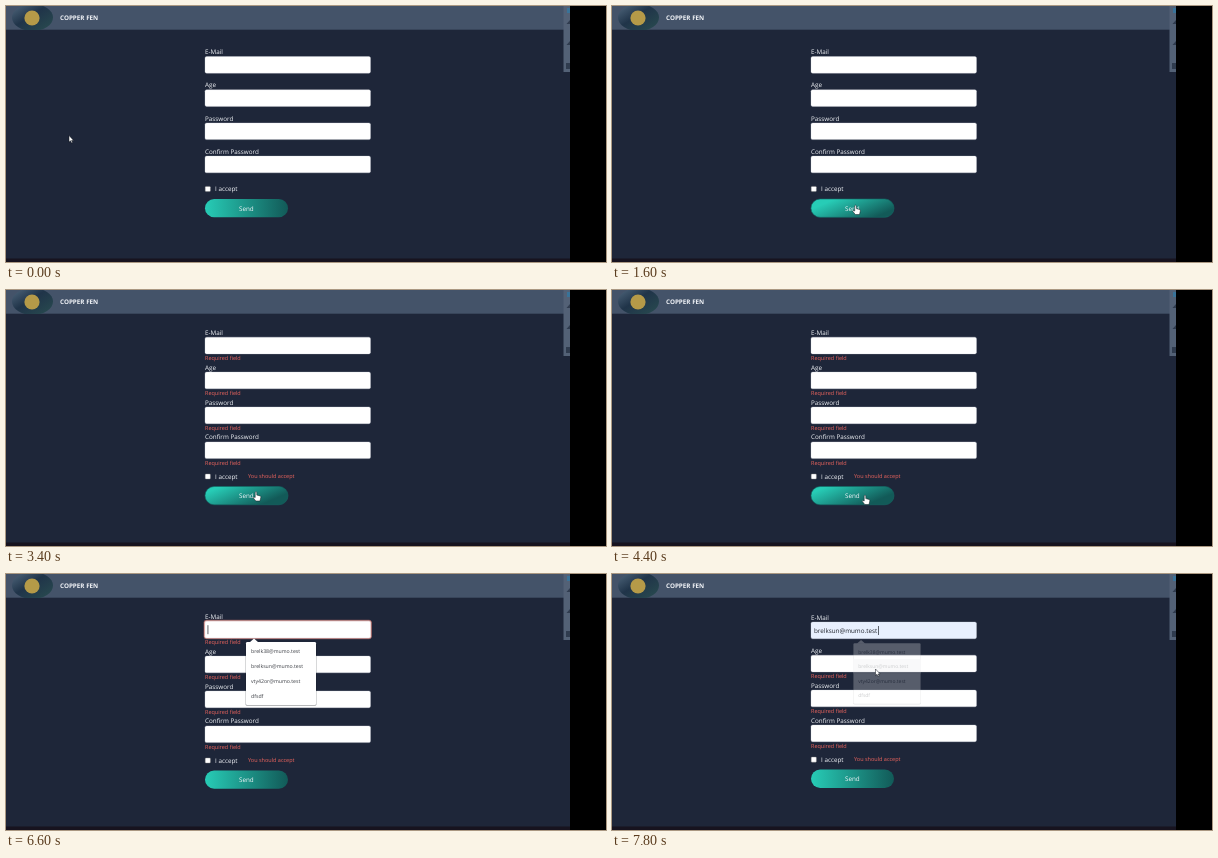
An HTML page that plays this animation: 600 by 256 pixels, repeating every 8000 ms.

```html
<!DOCTYPE html>
<html lang="en">
<head>
<meta charset="utf-8">
<title>Sign-up form</title>
<style>
  html, body { margin: 0; width: 100%; height: 100%; overflow: hidden; background: #1e2639; }
  svg { display: block; width: 600px; height: 256px; }
  text { font: 6.3px "Open Sans", "Noto Sans", sans-serif; fill: #f4f6fa; text-rendering: geometricPrecision; }
  .brand { font-weight: 700; }
  .error { font-size: 5.5px; fill: #ee655e; }
  .option { font-size: 5.2px; fill: #3c3f45; }
  .value { fill: #20242c; }
</style>
</head>
<body>
<svg viewBox="0 0 600 256">
  <defs>
    <linearGradient id="idle"><stop stop-color="#27ccb6"/><stop offset="1" stop-color="#125a58"/></linearGradient>
    <linearGradient id="hover" gradientUnits="userSpaceOnUse" x1="230" y1="190" x2="243" y2="220">
      <stop stop-color="#27ccb6"/><stop offset="1" stop-color="#125a58"/>
    </linearGradient>
    <linearGradient id="photo" x2="1" y2="1">
      <stop stop-color="#52697f"/><stop offset=".45" stop-color="#203449"/><stop offset="1" stop-color="#294d50"/>
    </linearGradient>
    <clipPath id="bar"><rect width="564" height="24"/></clipPath>
  </defs>

  <rect width="564" height="256" fill="#1e2639"/>
  <rect width="564" height="23.7" fill="#445369"/>
  <g clip-path="url(#bar)">
    <ellipse cx="26.5" cy="11.5" rx="20.5" ry="13.5" fill="url(#photo)"/>
    <circle cx="26" cy="12" r="7.6" fill="#b59a48"/>
  </g>
  <text class="brand" x="54" y="14.2">COPPER FEN</text>
  <rect y="252.5" width="564" height="3.5" fill="#17131f"/>

  <rect x="557.5" width="6.5" height="66" fill="#536176"/>
  <rect x="561" y="2" width="3" height="5" fill="#397399"/>
  <g fill="#2f3b4e">
    <path d="M560.5 18l3.5-4v4zM560.5 39l3.5-4v4z"/>
    <rect x="560" y="57" width="4" height="6"/>
  </g>
  <rect x="564" width="36" height="256" fill="#000"/>

  <g id="scene"></g>
</svg>

<script>
const LOOP = 8000, TICK = 200;
const ERRORS_AT = 2800, OPEN_AT = 5200, PICK_AT = 7800;
const labels = ["E-Mail", "Age", "Password", "Confirm Password"];
const options = ["brelk38@mumo.test", "brelksun@mumo.test", "vty42or@mumo.test", "dfsdf"];

// Pointer stops: time, x, y
const stops = [
  [0, 63, 129.5], [200, 63, 129.5], [1000, 223.5, 191], [1200, 225, 192],
  [1800, 250, 201.5], [3600, 250, 201.5], [4400, 253, 205], [4800, 251, 203],
  [5000, 246, 110], [6600, 263, 150], [6800, 263, 129], [7200, 263.5, 95], [8000, 263.5, 95]
];

const scene = document.getElementById("scene");
const ease = p => p * p * (3 - 2 * p);
const label = (x, y, body, kind = "") => `<text class="${kind}" x="${x}" y="${y}">${body}</text>`;
const box = (x, y, w, h, r, fill, extra = "") =>
  `<rect x="${x}" y="${y}" width="${w}" height="${h}" rx="${r}" fill="${fill}" ${extra}/>`;

function pointerAt(t) {
  const i = stops.findIndex(s => s[0] > t);
  const [t0, x0, y0] = stops[i - 1], [t1, x1, y1] = stops[i];
  const p = ease((t - t0) / (t1 - t0));
  return { x: x0 + (x1 - x0) * p, y: y0 + (y1 - y0) * p };
}

function pointer({ x, y }, hand) {
  const shape = hand
    ? "M-.8 .7Q0-.5 .8 .7V3.6L4.2 4.4Q5 4.8 4.8 6L4 9.5H-.2L-2.8 6.2Q-3-.0 -.8 6Z".replace("Q-3-.0 -.8 6", "Q-2.6 4.9-.8 6")
    : "M0 0V6.6L1.5 5.3L2.6 7.6L3.6 7.1L2.6 4.9H4.6Z";
  return `<path transform="translate(${x} ${y})" d="${shape}" fill="#fff" stroke="#10141d" stroke-width=".5"/>`;
}

function suggestions(row, fading) {
  const group = fading
    ? `opacity=".25" transform="translate(275 100) scale(.96) translate(-275 -100)"`
    : "";
  const rows = options.map((o, i) =>
    (i === row ? box(240, 69.5 + i * 15, 70, 15, 0, "#e9eaed") : "") +
    label(245, 78.9 + i * 15, o, "option")).join("");
  return `<g ${group}>${box(239.6, 68.6, 70.8, 63.2, 1.5, "#0b0f18", 'opacity=".4"')}
    <path d="M243.5 68.5L248 64.5L252.5 68.5Z" fill="#fff"/>
    ${box(240, 68, 70, 63, 1.2, "#fff")}${rows}</g>`;
}

function draw(t) {
  const picked = t >= PICK_AT, open = t >= OPEN_AT;
  const failed = labels.map((_, i) => t >= ERRORS_AT && !(picked && i === 0));
  const errors = failed.filter(Boolean).length;
  const tip = pointerAt(t);
  const hoverRow = Math.floor((tip.y - 69.5) / 15);
  const row = t >= 6800 && hoverRow >= 0 && hoverRow < options.length ? hoverRow : -1;
  const value = open && row >= 0 ? options[row] : "";

  let y = 50.5 - errors * .83, out = "";
  const emailY = y, sendY = y + 142.5 + errors * 1.7;
  labels.forEach((name, i) => {
    const email = i === 0;
    out += label(199, y - 2.4, name);
    if (email && open && !picked)
      out += box(198, y - 1, 167.5, 18.6, 2.4, "#eeb4ad", 'stroke="#a7605f" stroke-width=".6"');
    out += box(199, y, 165.5, 16.7, 1.6, email && value ? "#e8f0fe" : "#fff",
      'stroke="#cfd4dc" stroke-width=".3"');
    if (failed[i]) out += label(199, y + 22.8, "Required field", "error");
    y += 33.2 + (failed[i] ? 1.7 : 0);
  });

  out += label(202, emailY + 10.7, value, "value");
  const blinkOn = Math.floor((t - OPEN_AT) / 600) % 2 === 0;
  if (open && (picked || blinkOn && !value))
    out += box(picked ? 266 : 201.6, emailY + 4, .7, 9, 0, "#20242c");

  out += box(199.2, sendY - 12.6, 5.2, 5.2, .8, "#fff", 'stroke="#777" stroke-width=".4"');
  out += label(209, sendY - 7.6, "I accept");
  if (errors) out += label(242, sendY - 8.6, "You should accept", "error");

  const hover = t >= 1400 && t < 5000;
  out += box(199, sendY, 83, 18.3, 9.15, `url(#${hover ? "hover" : "idle"})`,
    hover ? 'stroke="#146b66" stroke-width=".6"' : "");
  out += label(233, sendY + 11.5, "Send");

  if (open) out += suggestions(row, picked);
  if (!open || t >= 6800) out += pointer(tip, hover);
  scene.innerHTML = out;
}

let shown = -1;
function frame(now) {
  const t = Math.floor(now % LOOP / TICK) * TICK;
  if (t !== shown) draw(shown = t);
  requestAnimationFrame(frame);
}
draw(0);
requestAnimationFrame(frame);
</script>
</body>
</html>
```
